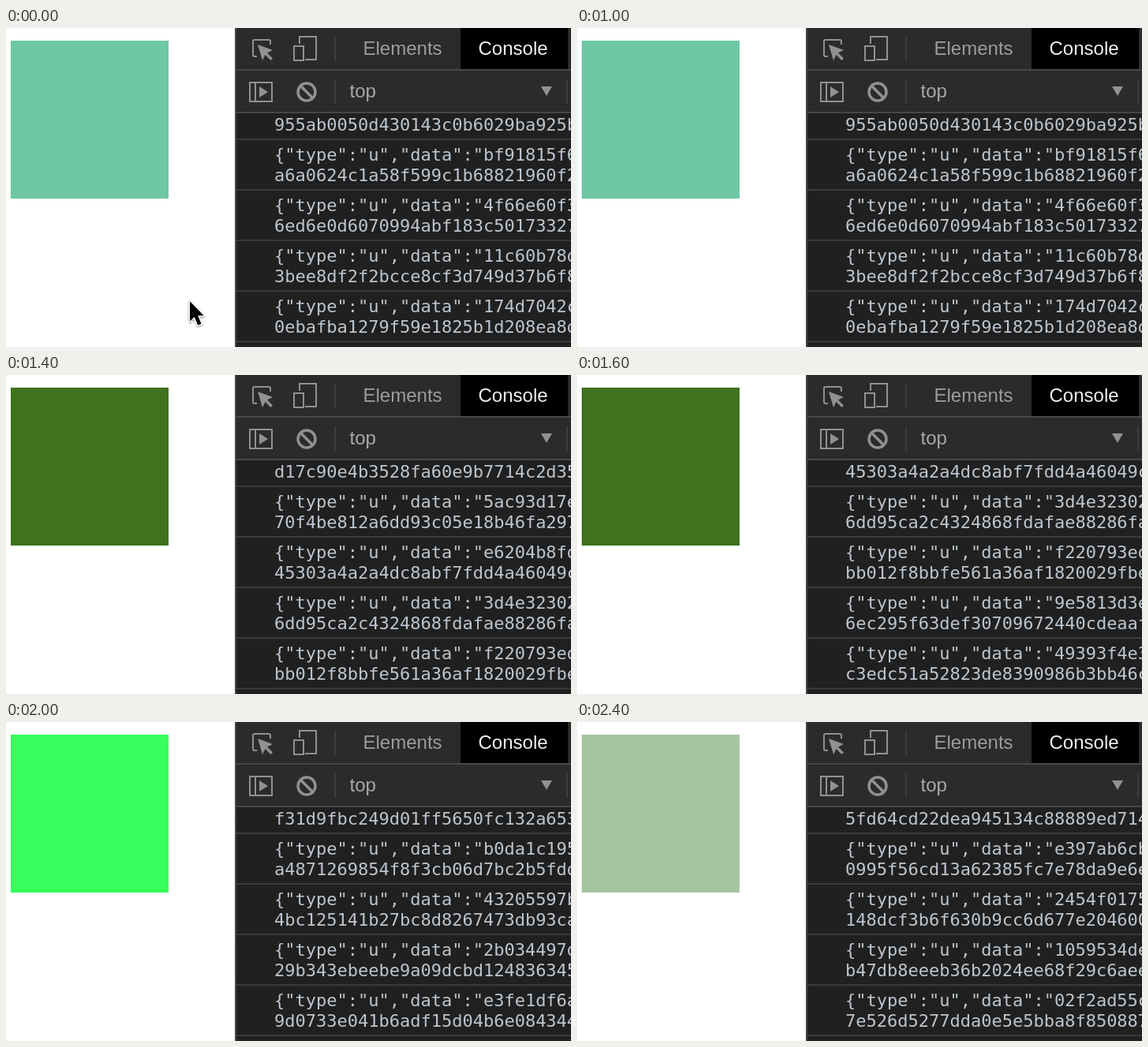
Animation, 716 px wide and 404 px high, one loop 3000 ms. Source, as an HTML page:

```html
<!DOCTYPE html>
<html lang="en">
<head>
<meta charset="utf-8">
<title>Colour square and console</title>
<style>
  html, body { margin: 0; width: 100%; height: 100%; overflow: hidden; background: #fff; }
  svg { display: block; width: 716px; height: 404px; }
  .ui { font: 24px "Liberation Sans", Arial, sans-serif; fill: #9c9c9c; }
  .log { font: 22px "DejaVu Sans Mono", Menlo, monospace; fill: #bdc6cf; white-space: pre; }
  .icon { fill: none; stroke: #919191; stroke-width: 2; }
  .solid { fill: #919191; stroke: none; }
  .rule { fill: #474747; }
  .row-rule { fill: #3a3a3a; }

  #square, #rows, #pointer { animation: 3s step-end infinite; }
  #square { animation-name: tint; }
  #rows { animation-name: scroll; }
  #pointer { animation-name: leave; filter: drop-shadow(0 1px 1.2px rgba(0, 0, 0, .45)); }

  @keyframes tint {
    0% { fill: #6dc8a3; }
    46.66% { fill: #3e721d; }
    60% { fill: #4fae48; }
    66.66% { fill: #38ff5c; }
    73.33% { fill: #a162b1; }
    80%, 100% { fill: #a5c59f; }
  }
  /* one log row is 64px tall */
  @keyframes scroll {
    0% { transform: translateY(0); }
    46.66% { transform: translateY(-320px); }
    53.33% { transform: translateY(-448px); }
    60% { transform: translateY(-660px); }
    66.66% { transform: translateY(-768px); }
    73.33% { transform: translateY(-1088px); }
    80%, 100% { transform: translateY(-1216px); }
  }
  @keyframes leave {
    0% { transform: translate(231px, 343px); visibility: visible; }
    6.66% { transform: translate(242px, 307px); visibility: visible; }
    13.33%, 100% { transform: translate(242px, 307px); visibility: hidden; }
  }
</style>
</head>
<body>
<svg viewBox="0 0 716 404" xmlns="http://www.w3.org/2000/svg">
  <clipPath id="view"><rect x="292" y="108" width="424" height="296"/></clipPath>

  <rect width="716" height="404" fill="#fff"/>
  <rect id="square" x="6" y="16" width="200" height="200"/>

  <!-- console panel -->
  <rect x="291" width="425" height="404" fill="#202020"/>
  <g clip-path="url(#view)"><g id="rows"></g></g>

  <!-- toolbars -->
  <rect x="291" width="425" height="107" fill="#2b2b2b"/>
  <rect x="576" width="136" height="52" fill="#000"/>
  <g class="rule">
    <rect x="290" width="2" height="404"/>
    <rect x="292" y="52" width="424" height="2"/>
    <rect x="292" y="106" width="424" height="2"/>
    <rect x="416" y="11" width="2" height="31" fill="#3d3d3d"/>
    <rect x="416" y="65" width="2" height="31" fill="#3d3d3d"/>
    <rect x="710" y="65" width="2" height="31" fill="#3d3d3d"/>
  </g>
  <g class="ui">
    <text x="452.5" y="34">Elements</text>
    <text x="598.5" y="34" fill="#f0f0f0">Console</text>
    <text x="435.5" y="88" fill="#a8a8a8">top</text>
  </g>

  <g class="icon">
    <path d="M318 36h-3q-2 0-2-2V17q0-2 2-2h18q2 0 2 2v4"/>
    <path class="solid" d="M319 21l19 7-7 3.500 7 7-2.500 2.500-7-7-3.500 7z"/>
    <path d="M372 20v-9h21v29h-14"/>
    <rect x="365" y="23" width="12" height="18"/>
    <rect x="309" y="69" width="28" height="24"/>
    <path d="M316 69v24"/>
    <path class="solid" d="M321 74l11 7-11 7z"/>
    <g stroke-width="3.500">
      <circle cx="381" cy="81" r="11"/>
      <path d="M373 73l16 16"/>
    </g>
    <path class="solid" d="M678 74h14l-7 12z"/>
  </g>

  <g id="pointer">
    <path d="M2 3v25.500l5.800-5.600 4.500 10.500 4.200-1.800-4.400-10.300h7.600z"
      fill="#000" stroke="#fff" stroke-width="3" paint-order="stroke" stroke-linejoin="round"/>
  </g>
</svg>
<script>
  // each entry: start of the data field, then the wrapped line below it
  const log = `
c07d41e92 955ab0050d430143c0b6029ba925b
bf91815f6 a6a0624c1a58f599c1b68821960f2
4f66e60f3 6ed6e0d6070994abf183c50173327
11c60b78d 3bee8df2f2bcce8cf3d749d37b6f8
174d7042c 0ebafba1279f59e1825b1d208ea8d
82be6f0a1 d17c90e4b3528fa60e9b7714c2d35
5ac93d17e 70f4be812a6dd93c05e18b46fa297
e6204b8fd 45303a4a2a4dc8abf7fdd4a46049c
3d4e32302 6dd95ca2c4324868fdafae88286fa
f220793ed bb012f8bbfe561a36af1820029fbe
9e5813d3e 6ec295f63def30709672440cdeaaf
49393f4e3 c3edc51a52823de8390986b3bb46c
7b15ce840 f31d9fbc249d01ff5650fc132a653
b0da1c195 a4871269854f8f3cb06d7bc2b5fdd
43205597b 4bc125141b27bc8d8267473db93ca
2b034497d 29b343ebeebe9a09dcbd124836345
e3fe1df6a 9d0733e041b6adf15d04b6e084344
90ad5e73b 06baa1f1307dc158f7f03eb1c54d1
abcd4985e bb4898cc2cdcbcb62e26f1e8797ab
dd33a0826 5fd64cd22dea945134c88889ed714
e397ab6cb 0995f56cd13a62385fc7e78da9e6e
2454f0175 148dcf3b6f630b9cc6d677e204600
1059534de b47db8eeeb36b2024ee68f29c6aee
02f2ad55c 7e526d5277dda0e5e5bba8f850887`.trim().split('\n');

  const line = (y, s) => `<text class="log" x="340" y="${y}">${s}</text>`;

  document.getElementById('rows').innerHTML = log.map((entry, i) => {
    const [head, tail] = entry.split(' ');
    const y = 104 + i * 64;
    return line(y, `{"type":"u","data":"${head}`) + line(y + 26, tail) +
      `<rect class="row-rule" x="292" y="${y + 36}" width="424" height="2"/>`;
  }).join('');
</script>
</body>
</html>
```
